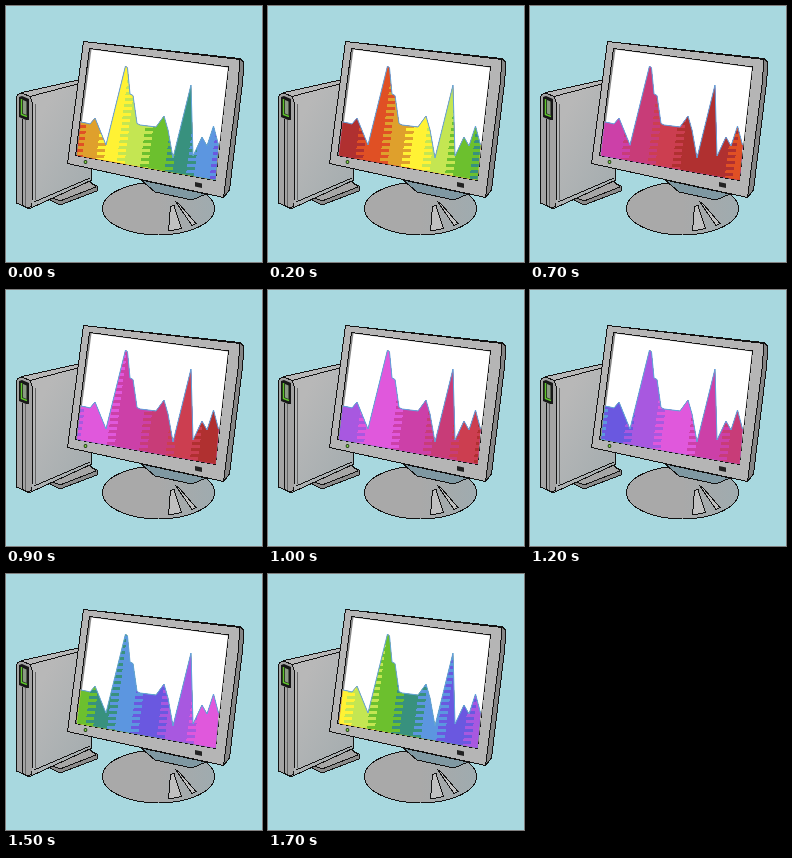
These frames come from a looping animation (256 by 256 pixels, 1800 ms). An HTML page:

```html
<!DOCTYPE html>
<html lang="en">
<head>
<meta charset="utf-8">
<title>Desktop chart</title>
<style>
html, body { margin: 0; width: 100%; height: 100%; overflow: hidden; background: #a8d8df; }
svg { display: block; width: 100vw; height: 100vh; }
.line { stroke: #111; stroke-width: 1; stroke-linejoin: round; shape-rendering: crispEdges; }
</style>
</head>
<body>
<svg viewBox="0 0 256 256">
  <defs>
    <clipPath id="area">
      <path d="M75 116 L80 117 84 118 89 112 100 139 119.500 60 121.500 62 124 88 127 89.500 131 117.500 134 119 150 121 158 110 162 124 167 152 185 79 187 150 196 131 201 140 207.500 120 212.500 139 209.500 174 71 149.500Z"/>
    </clipPath>
    <linearGradient id="side" x1="0" y1="0" x2="1" y2="1">
      <stop offset=".3" stop-color="#b8b8b8"/><stop offset="1" stop-color="#a2abae"/>
    </linearGradient>
    <linearGradient id="foot">
      <stop offset=".5" stop-color="#a9a9a9"/><stop offset="1" stop-color="#9fabaf"/>
    </linearGradient>
  </defs>
  <rect width="256" height="256" fill="#a8d8df"/>

  <!-- tower -->
  <g class="line">
    <path d="M42 193 L54 199 91 185 91 180 80 174Z" fill="#8c8c8c"/>
    <path d="M42 190 L54 195 90 181 80 172Z" fill="#a6a6a6"/>
    <path d="M10.500 91 L12 88.500 16 86.500 79 72.500 86 174 25 202 21 202 10.500 197Z" fill="url(#side)"/>
    <path d="M10.500 91 L12 88.500 16 87 24 90.500 26.500 97 26 200 22 202 10.500 197Z" fill="#a4a4a4"/>
    <path d="M24 90.500 L79 76 M16.500 113 V199 M28 196 L84 172" fill="none"/>
    <path d="M19.500 114 V200 M29.500 98 V194" fill="none" stroke="#666"/>
  </g>
  <path d="M13 91 L16 90 23 93 23 114 20 114 13 111Z" fill="#171717"/>
  <path d="M17 94 L20.500 95.500 V109 L17 107.500Z" fill="#8b9a84"/>
  <path d="M15.500 93 V108.500 L21 110.500" fill="none" stroke="#5fc42c" stroke-width="1.500"/>

  <!-- stand -->
  <ellipse class="line" cx="152.500" cy="202.500" rx="56" ry="26.500" fill="url(#foot)"/>
  <g class="line">
    <path d="M135 174 L149 186 186 194 200 188Z" fill="#7f98a2"/>
    <path d="M164.500 200.500 L168 199.500 175.500 222.500 162.500 225Z" fill="#c0c0c0"/>
    <path d="M169.500 195.500 L174 199 190 217.500 186 219.500Z" fill="#c0c0c0"/>
  </g>

  <!-- monitor -->
  <g class="line">
    <path d="M77.500 35.500 L234 52.500 238 56.500 236.500 77 223.500 184 217.500 191.500Z" fill="#858585"/>
    <path d="M77.500 35.500 L234 53.500 232 79 217.500 191.500 61.500 157.500Z" fill="#b5b5b5"/>
    <path d="M83.500 42.500 L222.500 61 209.500 174.500 69.500 149.500Z" fill="#888"/>
  </g>
  <path d="M85.500 43.500 L222 61.500 209.500 174 71.500 149.500Z" fill="#fff"/>
  <g clip-path="url(#area)">
    <g id="bands" transform="translate(17 0) skewX(-7.4)" shape-rendering="crispEdges"></g>
  </g>
  <path d="M75 116 L80 117 84 118 89 112 100 139 119.500 60 121.500 62 124 88 127 89.500 131 117.500 134 119 150 121 158 110 162 124 167 152 185 79 187 150 196 131 201 140 207.500 120 212.500 139" fill="none" stroke="#62a4dc"/>
  <path d="M189 176 L196 177.500 196 182 189 180.500Z" fill="#222"/>
  <circle cx="79.500" cy="156" r="1.900" fill="#1c3a12"/>
  <circle cx="79.500" cy="156" r="1" fill="#8be04a"/>
</svg>
<script>
const LOOP = 1800, STEP = 100, RING = 394;

// left edge of each colour on the ring
const ring = [
  [-4, '#b03030'], [50, '#e05024'], [75, '#dfa02c'], [97, '#fff234'],
  [118, '#c4e652'], [142, '#6cc02e'], [167, '#38917e'], [189, '#5c96e0'],
  [213, '#6a58e0'], [240, '#a858e0'], [270, '#e058dc'], [305, '#cc40a8'],
  [338, '#c83c78'], [365, '#cc3e50']
];

// step number and travel in pixels
const travel = [[0, 0], [4, 87], [7, 154], [10, 219], [12, 254], [15, 313], [17, 358], [18, RING]];

function offset(step) {
  const i = travel.findIndex(k => k[0] > step);
  const [a, x] = travel[i - 1], [b, y] = travel[i];
  return x + (y - x) * (step - a) / (b - a);
}

// stripe with a comb-shaped left edge
function comb(x) {
  let d = 'M300 50';
  for (let y = 50; y < 180; y += 6) {
    d += `L${x - 4} ${y}V${y + 3}H${x + 4}V${y + 6}`;
  }
  return d + 'H300Z';
}

const group = document.getElementById('bands');

function draw(step) {
  const shift = offset(step);
  const stripes = [];
  for (const lap of [-1, 0, 1]) {
    for (const [u, color] of ring) {
      const x = Math.round(u + shift + lap * RING);
      if (x > -80 && x < 230) stripes.push([x, color]);
    }
  }
  stripes.sort((a, b) => a[0] - b[0]);
  group.innerHTML = stripes.map(([x, c]) => `<path d="${comb(x)}" fill="${c}"/>`).join('');
}

let last = -1;
function tick(now) {
  const step = Math.floor(now % LOOP / STEP);
  if (step !== last) draw(last = step);
  requestAnimationFrame(tick);
}
draw(0);
requestAnimationFrame(tick);
</script>
</body>
</html>
```
